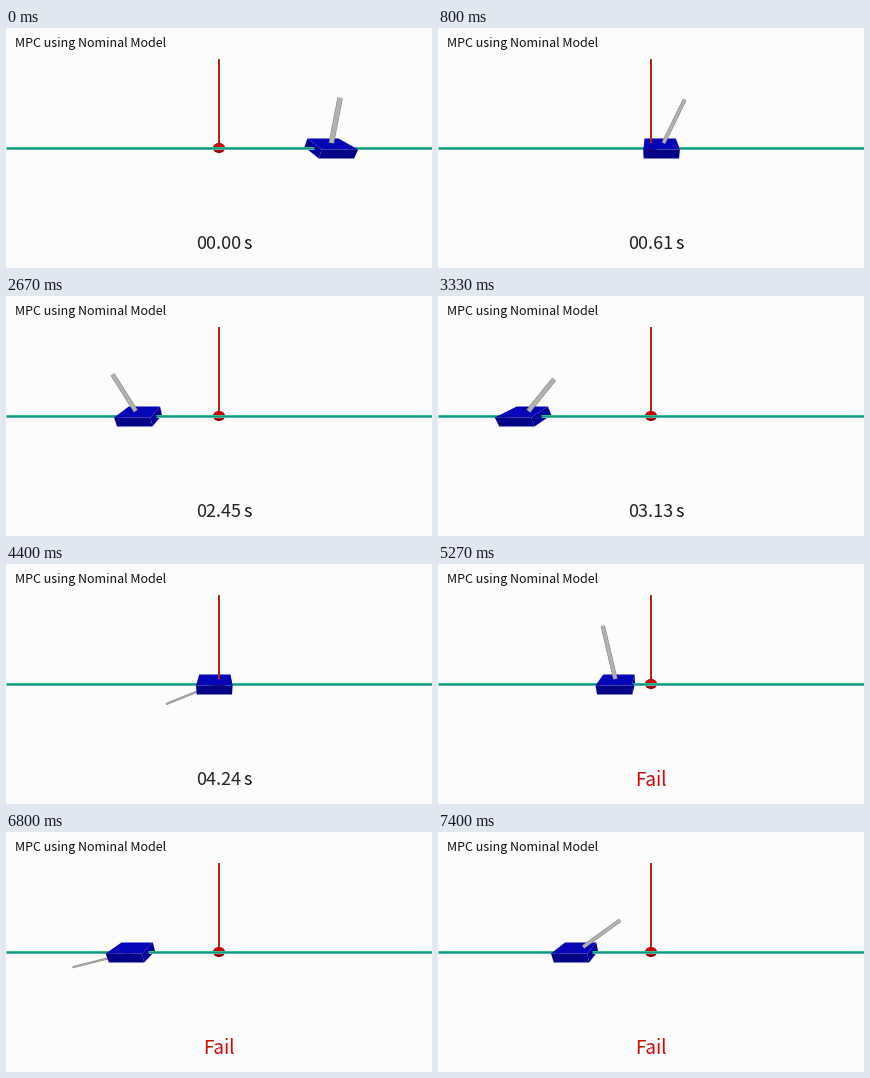
A matplotlib script that plays this animation: 426 px wide and 240 px high, repeating every 7470 ms.

```python
import numpy as np
import matplotlib.pyplot as plt
from matplotlib.animation import FuncAnimation
from matplotlib.patches import Ellipse, Polygon

W, H, DPI = 426, 240, 64
PT = 72 / DPI                     # points per pixel
LOOP, TICK = 7470, 30             # ms
CX, AXLE_Y = 213, 120.5
HALF = 17                         # half width of the cart
MID = 0.985                       # perspective scale at the rail

# Corner rows of the cart: (perspective scale, y)
BACK_TOP, FRONT_TOP = (0.92, 110.5), (1.07, 121.5)
BACK_LOW, FRONT_LOW = (0.89, 119), (1.04, 130.5)

# Motion keys at 15 steps per second: step, cart x, pole angle, pole length
KEYS = np.array([
    (0, 113, 11, 51.5),
    (3, 113, 11, 51.5),
    (12, 10, 26, 54.5),
    (29, 1, 251, 53),
    (50, -129, 399, 48),
    (66, -4.5, 608, 52.4),
    (92, -94, 817.5, 65),
    (111, -76.5, 1134, 55),
])
STEPS = KEYS[:, 0]
SLOPES = np.gradient(KEYS[:, 1:], STEPS, axis=0)
CLOCK = ([0, 3, 12, 29, 50, 66, 77.5], [0, 0, 0.61, 1.71, 3.13, 4.24, 5])
FAIL_STEP = 78


def pose(step):
    """Cubic Hermite interpolation of the motion keys."""
    i = min(np.searchsorted(STEPS, step, side="right"), len(STEPS) - 1) - 1
    h = STEPS[i + 1] - STEPS[i]
    u = (step - STEPS[i]) / h
    a, b = KEYS[i, 1:], KEYS[i + 1, 1:]
    return ((1 + 2 * u) * (1 - u) ** 2 * a + u * (1 - u) ** 2 * h * SLOPES[i]
            + u * u * (3 - 2 * u) * b + u * u * (u - 1) * h * SLOPES[i + 1])


def corner(row, x, side):
    scale, y = row
    return CX + scale * (x + side * HALF), y


fig = plt.figure(figsize=(W / DPI, H / DPI), dpi=DPI, facecolor="#fcfcfc")
ax = fig.add_axes([0, 0, 1, 1])
ax.set_xlim(0, W)
ax.set_ylim(H, 0)
ax.axis("off")


def stroke(xs, ys, color, width, z):
    line, = ax.plot(xs, ys, color=color, lw=width * PT, zorder=z,
                    solid_capstyle="butt")
    return line


def face(color, z):
    return ax.add_patch(Polygon([(0, 0)] * 3, fc=color, ec="none", zorder=z))


def label(x, y, text, size, weight, color="#111111"):
    return ax.text(x, y, text, fontsize=size * PT, color=color, weight=weight,
                   family="Noto Sans CJK JP", va="baseline", zorder=9)


# Goal marker
stroke([CX, CX], [31, 115], "#b02814", 2, 6)
stroke([CX, CX], [114, 120], "#b02814", 2, 1)
ax.add_patch(Ellipse((CX, 120), 12, 10, fc="#8c0000", ec="none", zorder=2))
ax.add_patch(Ellipse((CX, 119.3), 11, 8, fc="#cc0a05", ec="none", zorder=2))

# Rail, one half on each side of the cart
RAIL = [(118.7, "#3cc08c", 1), (119.7, "#0a9c78", 1.2), (120.7, "#58aeb4", 1)]
left_rail = [stroke([], [], c, w, 0) for _, c, w in RAIL]
right_rail = [stroke([], [], c, w, 0) for _, c, w in RAIL]

side_face = face("#000098", 4)
top_face = face("#0505b8", 4)
front_face = face("#030388", 4)
pole_edge = stroke([], [], "#858583", 3, 5)
pole_core = stroke([], [], "#b2b2ae", 2, 5)

label(9, 18.5, "MPC using Nominal Model", 12.5, 500)
clock = label(190, 221, "00.00", 18, 300, "#222222")
unit = label(237.5, 221, "s", 18, 500)
fail = label(197, 221.5, "Fail", 18.8, 500, "#d00808")


def draw_cart(x):
    near = -1 if x > 0 else 1     # the visible side faces the centre
    top_face.set_xy([corner(BACK_TOP, x, -1), corner(BACK_TOP, x, 1),
                     corner(FRONT_TOP, x, 1), corner(FRONT_TOP, x, -1)])
    front_face.set_xy([corner(FRONT_TOP, x, -1), corner(FRONT_TOP, x, 1),
                       corner(FRONT_LOW, x, 1), corner(FRONT_LOW, x, -1)])
    side_face.set_xy([corner(r, x, near) for r in
                      (BACK_TOP, BACK_LOW, FRONT_LOW, FRONT_TOP)])


def draw_rail(x):
    halves = ((left_rail, 0, -1, x > HALF), (right_rail, W, 1, x < -HALF))
    for lines, end, side, in_front in halves:
        inner = CX + MID * (x + side * HALF)
        for line, (y, _, _) in zip(lines, RAIL):
            line.set_data([end, inner], [y, y])
            line.set_zorder(5 if in_front else 0)


def draw_pole(x, angle, length):
    a = np.radians(angle)
    rise = np.cos(a)
    raised = rise > 0.25
    span = np.array([min(5.5 / rise, 17) if raised else 0, length])
    xs = CX + MID * x + span * np.sin(a)
    ys = AXLE_Y - span * rise
    width = 2.2 + (1.8 + 1.5 * abs(x) / 113) * max(rise, 0)
    for line, w in ((pole_edge, width), (pole_core, width - 1.2)):
        line.set_data(xs, ys)
        line.set_linewidth(w * PT)
        line.set_zorder(7 if raised else 3)


def update(i):
    step = int((i * TICK + 20) * 15 / 1000 + 1e-6)
    x, angle, length = pose(min(step, 111))
    draw_cart(x)
    draw_rail(x)
    draw_pole(x, angle, length)
    failed = step >= FAIL_STEP
    clock.set_text(f"{np.interp(step, *CLOCK):05.2f}")
    clock.set_visible(not failed)
    unit.set_visible(not failed)
    fail.set_visible(failed)
    return []


anim = FuncAnimation(fig, update, frames=LOOP // TICK, interval=TICK,
                     init_func=lambda: update(0), repeat=True, repeat_delay=0)
plt.show()
```
